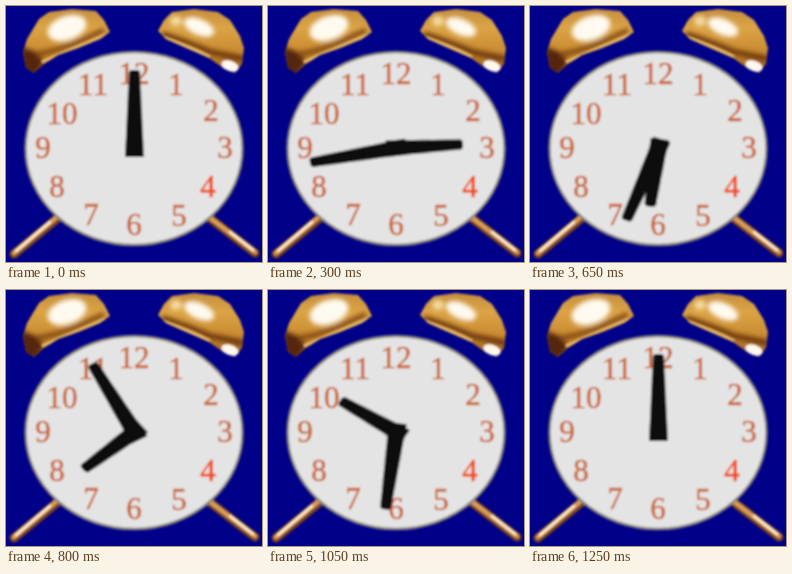
An HTML page that plays this animation: 256x256 px, repeating every 1.3 s.

```html
<!DOCTYPE html>
<html lang="en">
<head>
<meta charset="utf-8">
<title>Alarm clock</title>
<style>
  html, body { margin: 0; width: 100%; height: 100%; overflow: hidden; background: #000088; }
  svg { display: block; width: 100vw; height: 100vh; }
  text {
    font: 31px "Liberation Serif", "Noto Serif", serif;
    text-anchor: middle;
    fill: #c9683e;
    stroke: #c9683e;
    stroke-width: .6;
  }
  .hot { fill: #f04a1c; stroke: #f04a1c; }
  .hand { fill: #080808; transform-origin: 0 0; animation: turn 1300ms steps(26) infinite; }
  /* 26 held poses, 25 of them to a full cycle */
  .hour { --end: calc(360deg * 26 / 25); }
  .minute { --end: calc(1080deg * 26 / 25); }
  @keyframes turn {
    from { transform: rotate(0deg); }
    to { transform: rotate(var(--end)); }
  }
</style>
</head>
<body>
<svg viewBox="0 0 256 256" preserveAspectRatio="none">
  <defs>
    <linearGradient id="gold" x1="0" y1="0" x2="0" y2="1">
      <stop offset="0" stop-color="#c08a3c"/>
      <stop offset=".3" stop-color="#dca446"/>
      <stop offset=".65" stop-color="#c88a30"/>
      <stop offset="1" stop-color="#8a4c1c"/>
    </linearGradient>
    <clipPath id="domeL"><path d="M28 67L20 62L17 46L21 33L33 13L43 6L66 3L90 5L98 14L104 26L94 33L72 42L52 49L38 58Z"/></clipPath>
    <clipPath id="domeR"><path d="M229 67L217 62L203 52L180 42L160 33L152 25L158 14L166 6L188 3L212 6L224 14L234 30L238 42L236 58Z"/></clipPath>
    <filter id="soft"><feGaussianBlur stdDeviation="1"/></filter>
    <filter id="glow" x="-50%" y="-50%" width="200%" height="200%"><feGaussianBlur stdDeviation="2.2"/></filter>
  </defs>
  <rect width="256" height="256" fill="#000088"/>
  <g filter="url(#soft)">
    <g stroke-linecap="round" fill="none">
      <path d="M53 211L8 248M201 210L249 247" stroke="#7c4420" stroke-width="9"/>
      <path d="M52 210L8 247M203 211L249 246" stroke="#d89c58" stroke-width="4.5"/>
      <path d="M44 216L10 245M224 226L247 244" stroke="#fff0d4" stroke-width="2.4"/>
    </g>

    <g clip-path="url(#domeL)">
      <rect x="10" width="100" height="72" fill="url(#gold)"/>
      <g filter="url(#glow)">
        <path fill="#54260c" d="M14 40L30 46L38 56L28 70L16 66Z"/>
        <path fill="none" stroke="#824816" stroke-width="5" d="M30 48Q54 46 98 24"/>
        <ellipse cx="61" cy="22" rx="20" ry="12" transform="rotate(-20 61 22)" fill="#fffaf0"/>
      </g>
      <path fill="none" stroke="#e8b860" stroke-width="3" d="M36 56Q60 46 100 29"/>
    </g>

    <g clip-path="url(#domeR)">
      <rect x="148" width="95" height="72" fill="url(#gold)"/>
      <g filter="url(#glow)">
        <path fill="none" stroke="#6e3810" stroke-width="6" d="M156 28Q184 37 204 46L238 53"/>
        <ellipse cx="193" cy="21" rx="16" ry="8" transform="rotate(24 193 21)" fill="#fffaf0"/>
        <ellipse cx="170" cy="15" rx="6" ry="5" fill="#f4dca0"/>
      </g>
      <path fill="none" stroke="#e8b860" stroke-width="3" d="M156 31Q184 41 204 51"/>
    </g>
    <ellipse cx="224" cy="60" rx="9" ry="5" transform="rotate(20 224 60)" fill="#fff8ec"/>

    <ellipse cx="128" cy="142.5" rx="108.5" ry="96.5" fill="#e4e4e4" stroke="#8c887e" stroke-width="2.5"/>
    <g>
      <text x="128" y="78">12</text>
      <text x="170" y="89">1</text>
      <text x="205" y="115">2</text>
      <text x="219" y="152">3</text>
      <text x="202" y="191" class="hot">4</text>
      <text x="173" y="220">5</text>
      <text x="128" y="229">6</text>
      <text x="85" y="219">7</text>
      <text x="51" y="191">8</text>
      <text x="37" y="152">9</text>
      <text x="56" y="118">10</text>
      <text x="87" y="89">11</text>
    </g>

    <g transform="translate(128.4 142) scale(1.127 1)">
      <path class="hand hour" d="M-8 9L-5 -57L-3 -59L3 -59L5 -57L8 9Z"/>
      <path class="hand minute" d="M-8 9L-4.8 -76L-3 -78L3 -78L4.8 -76L8 9Z"/>
    </g>
  </g>
</svg>
</body>
</html>
```
